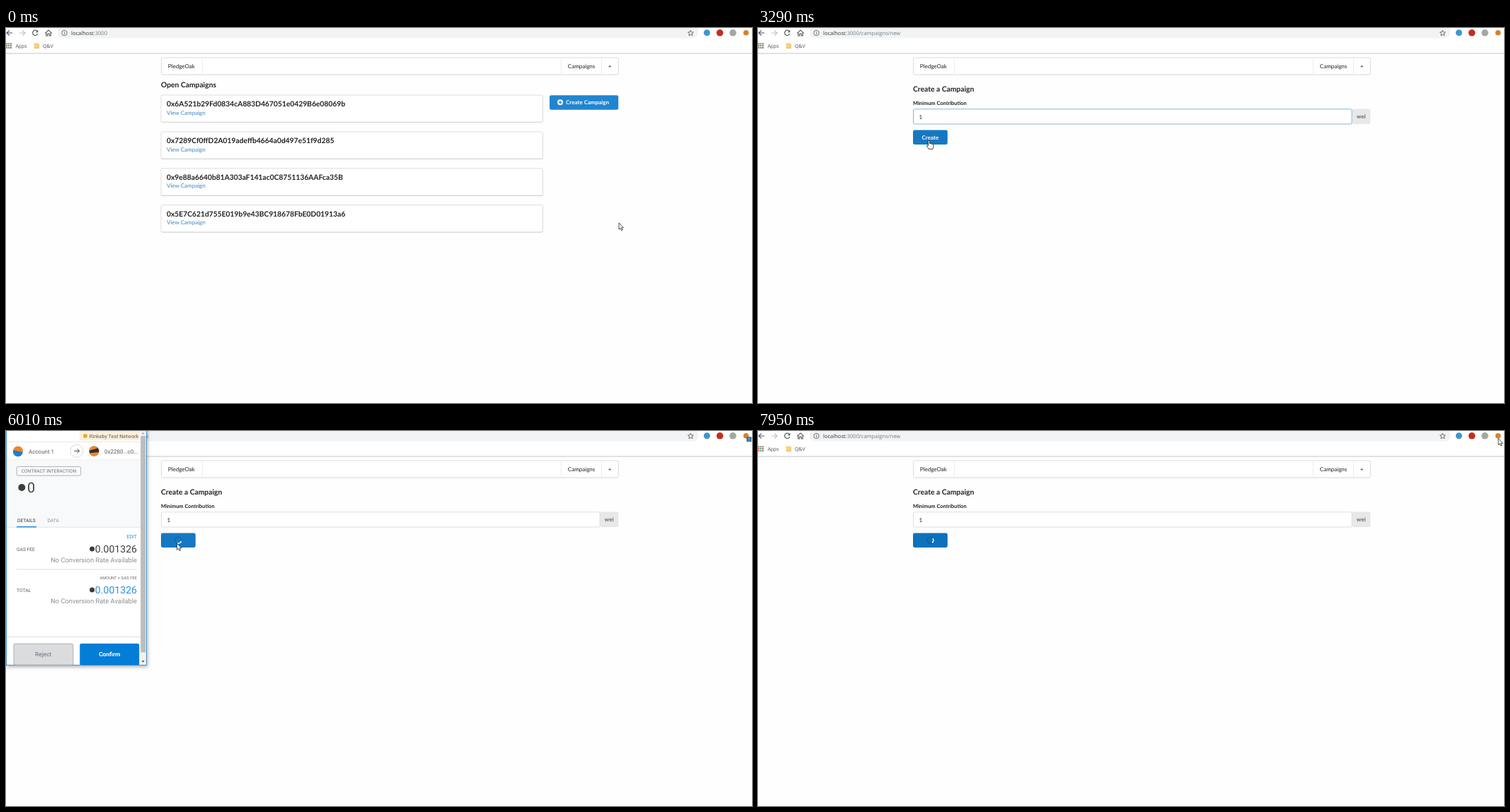
These frames come from a looping animation (1054 px wide and 531 px high, 8 s). An HTML page:

```html
<!DOCTYPE html>
<html lang="en">
<head>
<meta charset="utf-8">
<title>Create a campaign</title>
<style>
  html, body { margin: 0; width: 100%; height: 100%; overflow: hidden; background: #fefefe; }
  svg { display: block; width: 100vw; height: 100vh; }
  text { font-family: Lato, sans-serif; font-size: 8.03px; fill: #212121; text-rendering: geometricPrecision; white-space: pre; }
  .ui { font-family: "Open Sans", sans-serif; }
  .rb { font-family: Roboto, sans-serif; }
  .b { font-weight: 700; }
</style>
</head>
<body>
<svg id="stage" viewBox="0 0 1054 531"></svg>
<script>
const LOOP = 8000;
const svg = document.getElementById('stage');

// Markup helpers
const text = (x, y, s, a = '') => `<text x="${x}" y="${y}" ${a}>${s}</text>`;
const rect = (x, y, w, h, fill, a = '') =>
  `<rect x="${x}" y="${y}" width="${w}" height="${h}" fill="${fill}" ${a}/>`;
const dot = (x, y, r, fill, a = '') => `<circle cx="${x}" cy="${y}" r="${r}" fill="${fill}" ${a}/>`;
const line = (d, stroke, w = 1, a = '') =>
  `<path d="${d}" fill="none" stroke="${stroke}" stroke-width="${w}" ${a}/>`;
const group = (id, body, a = '') => `<g id="${id}" ${a}>${body}</g>`;
const size = (px, fill, cls = 'rb') => `class="${cls}" font-size="${px}" style="font-size:${px}px;fill:${fill}"`;
const END = 'text-anchor="end" ';
const MID = 'text-anchor="middle" ';
const HEAD = size(10.3, '#212121', 'b');

function browser() {
  let apps = '';
  for (let i = 0; i < 9; i++)
    apps += rect(0.3 + (i % 3) * 2.8, 21.4 + Math.floor(i / 3) * 2.8, 1.9, 1.9,
      ['#d9483b', '#5f6368', '#4a9a55'][(i * 2) % 3]);
  return rect(0, 0, 1054, 36, '#fff') +
    rect(73, -8, 905, 22.6, '#f1f3f4', 'rx="8"') +
    line('M0 36H1054', '#c6c8ca', 1.2) +
    line('M9 7H1.2M4.8 3.3L1.1 7L4.8 10.7', '#54575b', 1.2) +
    line('M19 7H26.8M23.2 3.3L26.9 7L23.2 10.7', '#b9bbbe', 1.1) +
    line('M44.3 4.6A3.7 3.7 0 1 0 44.8 8', '#54575b', 1.2) +
    '<path d="M45.3 2.8V6.3H41.8Z" fill="#54575b"/>' +
    line('M55.3 7.3L60 3L64.7 7.3M56.8 6.5V11H58.8V8H61.2V11H63.2V6.5', '#54575b', 1.1) +
    dot(82.5, 7, 3.7, 'none', 'stroke="#5f6368" stroke-width=".9"') +
    line('M82.5 6.4V9.1M82.5 4.8V5.6', '#5f6368', 0.9) +
    `<text x="92" y="9.8" ${size(7.57, '#34373a', 'ui')}>localhost<tspan fill="#777b80" style="fill:#777b80">:3000</tspan><tspan id="path" style="fill:#777b80"></tspan></text>` +
    line('M967.3 3L968.4 5.8L971.3 6L969 7.9L969.8 10.8L967.3 9.2L964.8 10.8L965.6 7.9L963.3 6L966.2 5.8Z', '#5f6368', 0.9) +
    dot(990.3, 6.8, 4.5, '#3f96cf') + dot(1008.6, 6.8, 4.8, '#c52d1c') +
    dot(1027, 6.8, 4.8, '#a3a79f') + dot(1045.6, 6.8, 3.8, '#d9822b') +
    group('badge', rect(1046.3, 8.2, 7, 7, '#3b6ea5', 'rx="1"') +
      text(1049.8, 13.8, '1', MID + size(5.6, '#fff', 'ui'))) +
    apps + text(13.4, 27.6, 'Apps', size(6.9, '#4a4d50', 'ui')) +
    rect(39.5, 21.5, 7, 7.6, '#f6d27c', 'rx=".8"') + line('M41 28.6H46.5V23', '#e2b452', 0.8) +
    text(52, 27.6, 'Q&amp;V', size(6.9, '#4a4d50', 'ui'));
}

function menu() {
  return rect(219.5, 42.7, 646, 24, '#000', 'opacity=".07" rx="2.5"') +
    rect(219.5, 42, 645.8, 24, '#fff', 'stroke="#dcdcdd" rx="2.3"') +
    line('M277.5 42V66M784.5 42V66M841.5 42V66', '#ececec') +
    text(228.8, 56.7, 'PledgeOak') + text(793.8, 56.7, 'Campaigns') + text(853, 56.7, '+', MID);
}

function listPage() {
  const ids = ['0x6A521b29Fd0834cA883D467051e0429B6e08069b', '0x7289Cf0ffD2A019adeffb4664a0d497e51f9d285',
    '0x9e88a6640b81A303aF141ac0C8751136AAFca35B', '0x5E7C621d755E019b9e43BC918678FbE0D01913a6'];
  const cards = ids.map((id, i) => {
    const y = 95 + i * 51.9;
    return rect(219, y + 0.8, 539.6, 38.3, '#d0d1d3', 'rx="2.3"') +
      rect(219, y, 539.5, 38.2, '#fff', 'rx="2.3" stroke="#d9dadb" stroke-width=".9"') +
      text(227, y + 16, id, HEAD) + text(227, y + 27.6, 'View Campaign', size(8.03, '#4183c4', ''));
  }).join('');
  return text(219, 84, 'Open Campaigns', HEAD) + cards +
    rect(768, 95.2, 97.2, 20.5, '#2185d0', 'id="add" rx="2.3"') +
    dot(783, 105.3, 4, '#fff') + line('M780.7 105.3H785.3M783 103V107.6', '#2185d0', 1.3) +
    text(791, 108.2, 'Create Campaign', size(8.03, '#fff', 'b'));
}

function formPage() {
  return text(219, 90.4, 'Create a Campaign', HEAD) +
    text(219, 109.2, 'Minimum Contribution', size(7.45, '#212121', 'b')) +
    rect(839, 114.5, 26.3, 21.6, '#e8e8e8', 'rx="2"') +
    text(852.2, 127.8, 'wei', MID + size(8.03, '#666', 'b')) +
    rect(219.5, 114.8, 619.5, 21.2, '#fff', 'id="field" rx="2" stroke="#dededf"') +
    text(227.6, 128.8, '1', 'id="value"') + rect(227.4, 121, 0.9, 10, '#333', 'id="caret"') +
    rect(219, 144.5, 48.8, 20.4, '#2185d0', 'id="send" rx="2.3"') +
    text(243.4, 157.6, 'Create', 'id="sendText" ' + MID + size(8.03, '#fff', 'b')) +
    group('loader', dot(243.4, 154.7, 4.4, 'none', 'stroke="#000" stroke-opacity=".15" stroke-width="1.6"') +
      line('M240.29 151.59A4.4 4.4 0 0 1 246.51 151.59', '#fff', 1.6, 'id="arc"'));
}

function feeRow(y, label, color) {
  return text(15, y, label, size(6.7, '#5b5b5b')) + dot(121.6, y - 2.6, 3.5, '#3c3c3b') +
    text(185, y + 2.5, '0.001326', END + size(14.1, color)) +
    text(185, y + 16, 'No Conversion Rate Available', END + size(9.33, '#8f8f8f'));
}

function walletView() {
  return rect(1, 0, 189, 331, '#fff') +
    rect(104, -2, 85, 15.5, '#fcf0dc', 'rx="1.5"') + dot(112, 7, 3, '#eda93a') +
    text(117.8, 9.6, 'Rinkeby Test Network', size(7.25, '#5b5b5b')) +
    line('M1 15.5H190M1 41H190', '#e6e6e6', 0.9) +
    dot(17, 28.5, 7, '#f5841f') + '<path d="M10.2 27A7 7 0 1 0 23.8 30Z" fill="#1c7fd0"/>' +
    text(32, 31.5, 'Account 1', size(8, '#5b5b5b')) +
    dot(100, 28.3, 9, '#fff', 'stroke="#d0d0d0" stroke-width=".8"') +
    line('M96.3 28.3H103.5M100.5 25.2L103.6 28.3L100.5 31.4', '#444', 1) +
    dot(124.5, 28.5, 7, '#27313f') + '<path d="M117.5 28A7 7 0 0 1 130 24.2L120 27Z" fill="#f5841f"/>' +
    '<path d="M118 31.2L131.4 30A7 7 0 0 1 118 31.2Z" fill="#f5841f"/>' +
    text(139, 31.5, '0x2280...c0...', size(8, '#5b5b5b')) +
    rect(1, 41.5, 189, 94.5, '#f8f9fa') +
    rect(15.2, 50.5, 90.5, 12.6, 'none', 'stroke="#9ea3a8" stroke-width=".8" rx="1.5"') +
    text(60.4, 59.3, 'CONTRACT INTERACTION', MID + size(6.65, '#6f767d')) +
    dot(22.3, 80, 5, '#3c3c3b') + text(30, 87.3, '0', size(19.8, '#444')) +
    text(16, 129, 'DETAILS', size(6.7, '#333')) + text(58.4, 129, 'DATA', size(6.7, '#8f8f8f')) +
    line('M1 136.3H190', '#dedede', 0.8) + line('M15 135.7H43', '#2487d3', 1.5) +
    text(185, 152.3, 'EDIT', END + size(7, '#2f8fdb')) + feeRow(169.6, 'GAS FEE', '#3f3f3f') +
    line('M15 196H185', '#dedede', 0.9) +
    text(185, 210.4, 'AMOUNT + GAS FEE', END + size(5.8, '#6a6a6a')) + feeRow(227.6, 'TOTAL', '#2f8fdb') +
    line('M1 291.5H190', '#dcdcdc', 0.9) +
    rect(11, 301.3, 83.8, 30, '#dbdcdd', 'rx="2.2" stroke="#a5a8ab" stroke-width=".9"') +
    text(52.7, 319, 'Reject', MID + size(8.4, '#646d77')) +
    rect(104.3, 301, 84, 30.6, '#037dd6', 'id="confirm" rx="2.2"') +
    text(146.3, 319, 'Confirm', MID + size(8.4, '#fff', 'rb b'));
}

function popup() {
  let spokes = '';
  for (let i = 0; i < 12; i++)
    spokes += rect(93.3, 107.3, 3.6, 10.6, '#eda537', `class="spoke" rx="1" transform="rotate(${i * 30} 95.1 124)"`);
  return rect(0.5, -10, 198, 341.5, '#fff', 'stroke="#4c97d2" filter="url(#shade)"') +
    group('spokes', spokes) + group('wallet', walletView()) +
    group('bar', rect(189.8, 0, 8.2, 331, '#f1f1f1') + rect(190.3, 7, 6.8, 306.5, '#bdbdbd') +
      '<path d="M191.6 4.3H195.6L193.6 2Z" fill="#a0a0a0"/><path d="M191.6 325.3H195.6L193.6 327.8Z" fill="#444"/>') +
    group('status', rect(0.5, 319.7, 65.3, 11.5, '#fff', 'stroke="#d5d7d9" stroke-width=".8"') +
      text(2.6, 328, 'Establishing secure...', size(6.4, '#777', 'ui')));
}

function pointers() {
  return dot(0, 0, 7.5, '#d3d31c', 'id="spot" opacity=".82"') +
    '<g id="pointer">' +
    '<path id="arrow" d="M0 0V9.2L2.1 7.3L3.6 10.7L5.1 10L3.6 6.8H6.4Z" fill="#fff" stroke="#222" stroke-width=".8"/>' +
    '<path id="hand" d="M-1 1Q-1 0 0 0T1 1V4.8Q2.2 4 3 5Q4.2 4.4 4.8 5.5Q6.4 5.2 6.4 6.8V9Q6.3 11 5.4 12.4H-.2L-3.2 8Q-2.7 6.1-1 7.6Z" fill="#fff" stroke="#222" stroke-width=".85"/>' +
    line('M-2.2-6.5H-.6L0-6L.6-6.5H2.2M0-6V6M-2.2 6.5H-.6L0 6L.6 6.5H2.2', '#222', 0.8, 'id="beam"') + '</g>';
}

svg.innerHTML =
  '<defs><filter id="shade" x="-10%" y="-10%" width="125%" height="125%"><feDropShadow dx="1" dy="2" stdDeviation="2.6" flood-opacity=".32"/></filter></defs>' +
  rect(0, 0, 1054, 531, '#fefefe') + browser() + menu() + group('list', listPage()) + group('form', formPage()) +
  group('popup', popup()) + pointers();

const el = {};
svg.querySelectorAll('[id]').forEach(n => el[n.id] = n);
const spokes = [...svg.querySelectorAll('.spoke')];
const show = (n, on) => n.setAttribute('display', on ? 'inline' : 'none');
const set = (n, name, v) => n.setAttribute(name, v);

const BURSTS = [[300, 1080, 11], [1150, 1930, 11], [2020, 2100, 2], [2570, 2570, 1], [2710, 2710, 1], [2880, 3290, 6],
  [3520, 4320, 11], [4400, 5170, 11], [5240, 6010, 11], [6090, 6870, 11], [6940, 7730, 11], [7810, 7950, 3]];
function held(t) {
  let now = 0;
  for (const [a, b, n] of BURSTS) {
    if (t < a) break;
    const d = n > 1 ? (b - a) / (n - 1) : 1;
    now = Math.min(b, a + Math.floor((t - a) / d + 1e-6) * d);
  }
  return now;
}

// Pointer moves: start, end, target
const MOVES = [[300, 1000, 832, 107], [1230, 1930, 302.5, 124.5], [2880, 3290, 241.5, 159],
  [6090, 6480, 158.5, 308.5], [7020, 7730, 1044.5, 12], [7810, 7950, 1046, 10.5]];
const clamp = v => Math.max(0, Math.min(1, v));
function pointerAt(t) {
  let x = 866, y = 276;
  for (const [a, b, tx, ty] of MOVES) {
    const u = clamp((t - a) / (b - a)), k = u * u * (3 - 2 * u);
    x += (tx - x) * k;
    y += (ty - y) * k;
  }
  return [x, y];
}

const CLICKS = [[1080, 1230], [2020, 2100], [3520, 3670], [6790, 6940]];
const within = (t, a, b) => t >= a && t < b;

function render(time) {
  const t = held(time);
  const [x, y] = pointerAt(t);
  const over = (x0, y0, x1, y1) => x >= x0 && x <= x1 && y >= y0 && y <= y1;
  const form = t >= 1380, loading = t >= 3670, open = within(t, 4150, 7240), wallet = t >= 5780;
  const pressed = CLICKS.some(([a, b]) => within(t, a - 1, b - 1));

  show(el.list, !form);
  show(el.form, form);
  el.path.textContent = form ? '/campaigns/new' : '';
  show(el.badge, within(t, 3990, 7160));

  const onAdd = !form && over(768, 95, 865, 116);
  set(el.add, 'fill', onAdd ? (pressed ? '#1a69a4' : '#1678c2') : '#2185d0');

  const focused = within(t, 2020, 3590);
  set(el.field, 'stroke', focused ? '#85b7d9' : '#dededf');
  show(el.value, t >= 2710);
  show(el.caret, within(t, 2020, 2570) || within(t, 2710, 3200));
  set(el.caret, 'x', t >= 2710 ? 232.4 : 227.4);

  const onSend = form && over(219, 144, 268, 165);
  set(el.send, 'fill', onSend ? (pressed ? '#1a69a4' : '#1678c2') : t >= 7240 ? '#0d71bb' : '#2185d0');
  show(el.sendText, !loading);
  show(el.loader, loading);
  set(el.arc, 'transform', `rotate(${(t - 4240) / 400 * 360} 243.4 154.7)`);

  show(el.popup, open);
  const grow = t < 4200 ? 0.5 : t < 4300 ? 0.92 : t >= 7170 ? 0.45 : 1;
  set(el.popup, 'opacity', grow);
  set(el.popup, 'transform', `translate(99 165) scale(${0.94 + 0.06 * grow}) translate(-99 -165)`);
  show(el.spokes, within(t, 4700, 5780));
  spokes.forEach((s, i) => {
    const age = ((t - 5548) / 1000 + (1.5 - i) / 12) % 1;
    set(s, 'opacity', 1 - (age + 1) % 1);
  });
  show(el.bar, t >= 4550);
  show(el.status, within(t, 5240, 5780));
  show(el.wallet, wallet);
  const onConfirm = open && wallet && over(104, 301, 188, 331);
  set(el.confirm, 'fill', onConfirm ? (pressed ? '#0260a4' : '#0372c3') : '#037dd6');

  const hand = onAdd || (onSend && !loading) || onConfirm;
  const beam = form && !hand && over(219, 114, 839, 136);
  show(el.hand, hand);
  show(el.beam, beam);
  show(el.arrow, !hand && !beam);
  set(el.pointer, 'transform', `translate(${x} ${y})`);
  show(el.spot, pressed);
  set(el.spot, 'transform', `translate(${x} ${y})`);
}

const start = performance.now();
function tick() {
  render((performance.now() - start) % LOOP);
  requestAnimationFrame(tick);
}
tick();
</script>
</body>
</html>
```
